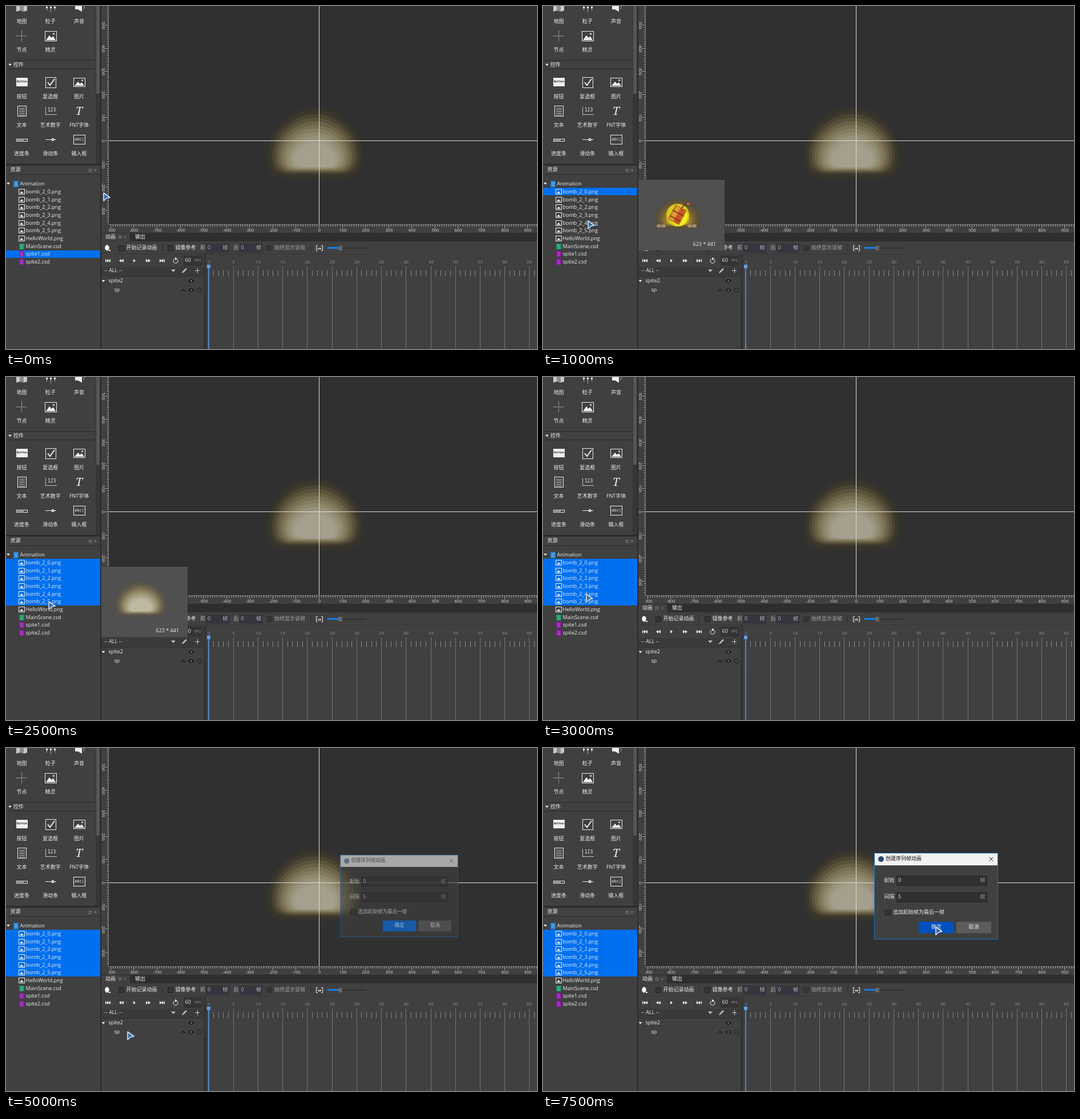
These frames come from a looping animation (930x602 px, 8000 ms). An HTML page with a canvas:

```html
<!DOCTYPE html>
<html lang="zh-CN">
<head>
<meta charset="utf-8">
<title>Animation editor</title>
<style>
  html, body { margin: 0; width: 100%; height: 100%; overflow: hidden; background: #404040; }
  canvas { display: block; }
</style>
</head>
<body>
<canvas id="stage" width="930" height="602"></canvas>
<script>
const ctx = document.getElementById('stage').getContext('2d');
const SANS = '"Open Sans", "Noto Sans CJK SC", "Noto Sans CJK", sans-serif';
const SERIF = '"Noto Serif", serif';
const MONO = '"DejaVu Sans Mono", monospace';
const LIGHT = '#eeeeee', PANEL = '#404040', DARK = '#303030', BLUE = '#0070f0';

// Drawing helpers
function rect(x, y, w, h, color) {
  ctx.fillStyle = color;
  ctx.fillRect(x, y, w, h);
}
function frame(x, y, w, h, color, width = 1) {
  ctx.strokeStyle = color;
  ctx.lineWidth = width;
  ctx.strokeRect(x + .5, y + .5, w - 1, h - 1);
}
function text(str, x, y, color = LIGHT, align = 'left', size = 9, font = SANS) {
  ctx.font = `${size}px ${font}`;
  ctx.textAlign = align;
  ctx.textBaseline = 'middle';
  ctx.fillStyle = color;
  ctx.fillText(str, x, y);
}
function trace(points) {
  ctx.beginPath();
  for (let i = 0; i < points.length; i += 2) ctx.lineTo(points[i], points[i + 1]);
}
function poly(color, ...points) {
  trace(points);
  ctx.fillStyle = color;
  ctx.fill();
}
function line(color, width, ...points) {
  trace(points);
  ctx.strokeStyle = color;
  ctx.lineWidth = width;
  ctx.stroke();
}
function ellipse(x, y, rx, ry, color) {
  ctx.beginPath();
  ctx.ellipse(x, y, rx, ry, 0, 0, 7);
  ctx.fillStyle = color;
  ctx.fill();
}
function ring(x, y, r, color, from = 0, to = 7) {
  ctx.beginPath();
  ctx.arc(x, y, r, from, to);
  ctx.strokeStyle = color;
  ctx.lineWidth = 1;
  ctx.stroke();
}
function cross(x, y, r, color) {
  line(color, 1, x - r, y - r, x + r, y + r);
  line(color, 1, x + r, y - r, x - r, y + r);
}
function at(x, y, draw, angle = 0) {
  ctx.save();
  ctx.translate(x, y);
  ctx.rotate(angle);
  draw();
  ctx.restore();
}

// Nested bands that shrink towards the bright core
function dome(cx, top, w, h, colors) {
  colors.forEach((color, i) => {
    const f = i / (colors.length - 1);
    const half = w / 2 * (1 - .58 * f), t = top + h * .5 * f;
    const b = top + h * (1 - .17 * Math.sqrt(f)), s = t + (b - t) * .68;
    ctx.beginPath();
    ctx.moveTo(cx - half, s);
    ctx.bezierCurveTo(cx - half, t + (s - t) * .5, cx - half * .52, t, cx, t);
    ctx.bezierCurveTo(cx + half * .52, t, cx + half, t + (s - t) * .5, cx + half, s);
    ctx.bezierCurveTo(cx + half, b - (b - s) * .2, cx + half * .85, b, cx + half * .5, b);
    ctx.lineTo(cx - half * .5, b);
    ctx.bezierCurveTo(cx - half * .85, b, cx - half, b - (b - s) * .2, cx - half, s);
    ctx.fillStyle = color;
    ctx.fill();
  });
}

// Left panels
function picture(x, y, w, h) {
  frame(x, y, w, h, LIGHT);
  poly(LIGHT, x + 2, y + h - 2, x + w * .38, y + h * .42, x + w * .55, y + h * .65,
    x + w * .7, y + h * .5, x + w - 2, y + h - 2);
  rect(x + w * .68, y + h * .2, w * .12, h * .15, LIGHT);
}
function drawWidgets() {
  const names = [['地图', '粒子', '声音'], ['节点', '精灵'], ['按钮', '复选框', '图片'],
    ['文本', '艺术数字', 'FNT字体'], ['进度条', '滑动条', '输入框']];
  const rows = [28, 78, 160, 210, 260];
  names.forEach((row, r) => row.forEach((name, c) => text(name, 27.5 + c * 50.3, rows[r], LIGHT, 'center')));

  poly('#c8c8c8', 18, 0, 24, 0, 24, 8, 18, 10);
  poly('#8c8c8c', 24, 0, 31, 0, 31, 10, 24, 8);
  poly('#c8c8c8', 31, 0, 37, 0, 37, 8, 31, 10);
  for (const [x, y] of [[71, 8], [78, 11], [85, 8]]) {
    line('#b0b0b0', 1, x + .5, 3, x + .5, y);
    rect(x - 1, 1, 3, 3, LIGHT);
  }
  poly(LIGHT, 121, 0, 133, 0, 133, 10, 126, 6, 121, 6);
  ring(132, 2, 5, '#b0b0b0', -.8, .9);

  ctx.setLineDash([2, 1]);
  line('#c0c0c0', 1, 18, 52.5, 37, 52.5);
  line('#c0c0c0', 1, 27.5, 43, 27.5, 62);
  ctx.setLineDash([]);
  picture(68, 44, 21, 18);
  rect(18, 126, 20, 15, '#f0f0f0');
  text('Button', 28, 133, '#222', 'center', 'bold 5', MONO);
  frame(69, 125, 19, 19, LIGHT);
  line(LIGHT, 2, 73, 134, 77, 139, 85, 128);
  picture(118, 126, 21, 16);
  frame(20, 175, 16, 19, LIGHT);
  for (let y = 179; y < 192; y += 3) line('#c0c0c0', 1, 23, y + .5, 33, y + .5);
  text('123', 80, 183, LIGHT, 'center', 8, MONO);
  line('#c0c0c0', 1, 69.5, 177, 69.5, 191.5);
  line('#c0c0c0', 1, 69, 190.5, 89, 190.5);
  text('T', 128, 185, LIGHT, 'center', 'italic 20', SERIF);
  frame(18, 233, 20, 5, LIGHT);
  rect(20, 235, 11, 1, LIGHT);
  line(LIGHT, 1, 69, 234.5, 88, 234.5);
  ellipse(82, 234.5, 2.5, 2.5, LIGHT);
  rect(81, 234, 2, 1, PANEL);
  frame(118, 226, 21, 17, LIGHT);
  text('abc|', 128.5, 234, LIGHT, 'center', 7, MONO);
}
const files = ['bomb_2_0.png', 'bomb_2_1.png', 'bomb_2_2.png', 'bomb_2_3.png', 'bomb_2_4.png',
  'bomb_2_5.png', 'HelloWorld.png', 'MainScene.csd', 'spite1.csd', 'spite2.csd'];
const rowY = i => 326 + i * 13.67;
const rowTop = i => Math.round(318.6 + i * 13.75);

function drawLeft([first, last]) {
  rect(0, 0, 167, 602, PANEL);
  drawWidgets();
  rect(157, 0, 9, 278, '#363636');
  rect(158, 0, 6, 154, '#565656');
  rect(0, 95, 157, 1, '#2c2c2c');
  rect(0, 110, 157, 1, '#2c2c2c');
  poly(LIGHT, 4, 101.5, 10, 101.5, 7, 105);
  text('控件', 13, 104);
  rect(0, 277, 166, 3, '#2c2c2c');
  rect(0, 280, 166, 15, '#424242');
  rect(0, 295, 166, 1, '#2c2c2c');
  text('资源', 7.5, 288);
  frame(145, 286, 5, 5, '#808080');
  cross(156, 288, 2, '#808080');

  poly(LIGHT, 1, 310, 7, 310, 4, 313.5);
  rect(13, 307, 9, 11, '#2080d0');
  for (let y = 309; y < 317; y += 2) rect(15, y, 5, 1, '#78b4e4');
  text('Animation', 24.5, 312.5);
  rect(0, rowTop(first), 165, rowTop(last + 1) - rowTop(first), BLUE);
  files.forEach((name, i) => {
    const y = Math.round(rowY(i));
    if (i < 7) {
      frame(22, y - 5, 11, 10, LIGHT);
      poly(LIGHT, 24, y + 3, 27, y - 1, 31, y + 3);
    } else {
      rect(23, y - 5, 9, 10, i === 7 ? '#189060' : '#8c18a4');
      for (let d = -3; d < 4; d += 2) rect(25, y + d, 5, 1, i === 7 ? '#58c090' : '#b850cc');
    }
    text(name, 34.5, y + .5);
  });
  rect(165, 0, 2, 602, '#2c2c2c');
}

// Viewport with rulers
const UNIT = .4057, ORIGIN_X = 548, ORIGIN_Y = 236;
function drawViewport() {
  rect(167, 0, 763, 398, PANEL);
  rect(180, 0, 750, 384, DARK);
  dome(541, 177, 170, 127, ['#35332c', '#3d382c', '#4a4432', '#5a523b', '#6a6147', '#797053',
    '#857c5f', '#90886d', '#98917a', '#9f9a85', '#a5a08e']);
  rect(ORIGIN_X, 0, 1, 384, '#deded6');
  rect(180, ORIGIN_Y, 750, 1, '#deded6');

  ctx.save();
  ctx.beginPath();
  ctx.rect(180, 384, 750, 15);
  ctx.clip();
  for (let u = -910; u <= 940; u += 10) {
    const x = Math.round(ORIGIN_X + u * UNIT), major = u % 100 === 0;
    rect(x, 384, 1, major ? 6 : 3, '#a8a8a8');
    if (major) text(u, x + 1, 394, '#d8d8d8', 'center', 7.5);
  }
  ctx.restore();
  for (let u = -350; u <= 580; u += 10) {
    const y = Math.round(ORIGIN_Y - u * UNIT), major = u % 100 === 0;
    rect(major ? 174 : 177, y, major ? 6 : 3, 1, '#a8a8a8');
    if (major) at(170, y + 1, () => text(u, 0, 0, '#d8d8d8', 'center', 7.5), Math.PI / 2);
  }
  rect(179, 0, 1, 384, '#7c7c7c');
  rect(180, 383, 750, 1, '#7c7c7c');
}

// Timeline
function checkbox(x, y, border = '#222') {
  rect(x, y, 10, 10, '#343434');
  frame(x, y, 10, 10, border);
}
function eye(x, y) {
  ellipse(x, y, 5, 3, '#1e1e1e');
  ellipse(x, y, 1.5, 1.5, '#777');
}
function transportIcons() {
  const y = 447, tri = (x, d) => poly(LIGHT, x, y - 3, x, y + 3, x + 4 * d, y);
  rect(174, y - 3, 1, 6, LIGHT); tri(179, -1); tri(183, -1);
  tri(202, -1); tri(206, -1);
  tri(223, 1);
  tri(245, 1); tri(249, 1);
  tri(269, 1); tri(273, 1); rect(277, y - 3, 1, 6, LIGHT);
  ring(297, 447.5, 4, LIGHT, -.9, 4.2);
  poly(LIGHT, 296, 441, 300, 443.5, 296, 446);
}
function drawTimeline() {
  rect(167, 398, 763, 15, '#2e2e2e');
  rect(167, 399, 50, 14, PANEL);
  text('动画', 174, 406);
  frame(197, 403, 5, 5, '#808080');
  cross(208.5, 405.5, 2, '#808080');
  text('输出', 226, 406);

  rect(167, 413, 763, 189, PANEL);
  rect(167, 435, 763, 1, '#363636');
  ellipse(177, 424.5, 3.8, 5, '#f4f4f4');
  rect(180, 428, 3, 2, LIGHT);
  checkbox(197, 420);
  text('开始记录动画', 210.5, 425);
  rect(273, 417, 1, 15, '#2c2c2c');
  checkbox(283, 420);
  text('镜像参考', 296.5, 425);
  [['前', 340], ['后', 398.5]].forEach(([name, x]) => {
    text(name, x, 425, '#b8b8c0');
    rect(x + 10, 417, 41, 16, '#35353d');
    text('0', x + 13, 425, '#b8b8c0');
    text('帧', x + 39.5, 425, '#b8b8c0');
  });
  checkbox(456, 420, '#303030');
  text('始终显示该帧', 470, 425, '#a4a4a4');
  rect(533, 417, 1, 15, '#2c2c2c');
  line(LIGHT, 1, 546, 420.5, 543.5, 420.5, 543.5, 429.5, 546, 429.5);
  line(LIGHT, 1, 552, 420.5, 554.5, 420.5, 554.5, 429.5, 552, 429.5);
  line(LIGHT, 1, 546.5, 424, 546.5, 426.5, 551.5, 426.5, 551.5, 424);
  rect(549, 424, 1, 2, LIGHT);
  rect(586, 424, 45, 2, '#303030');
  rect(563, 423, 19, 3, '#1080f0');
  rect(582, 421, 7, 8, '#666');

  transportIcons();
  rect(311, 438, 33, 18, '#333');
  text('60', 313.5, 447);
  text('FPS', 330, 447, '#999', 'left', 7);
  rect(167, 458, 180, 16, '#3a3a3a');
  text('-- ALL --', 172, 465);
  poly('#c0c0c0', 289, 462.5, 297, 462.5, 293, 467);
  line('#c0c0c0', 2.5, 310, 467, 316, 461);
  poly('#c0c0c0', 308, 469, 309, 466, 311, 468);
  line('#c8c8c8', 1, 331, 464.5, 339, 464.5);
  line('#c8c8c8', 1, 335.5, 460, 335.5, 469);

  rect(167, 474, 180, 1, '#303030');
  poly(LIGHT, 167.5, 481, 173.5, 481, 170.5, 484.5);
  text('spite2', 179.5, 483);
  eye(324.5, 482.5);
  text('sp', 189.5, 499);
  line('#1e1e1e', 1.5, 306, 501, 310, 497, 314, 501);
  eye(324.5, 498.5);
  ring(339, 498.5, 3.8, '#1e1e1e');
  rect(346, 436, 5, 166, '#363636');
  rect(347, 508, 2, 94, '#2e2e2e');

  for (let i = 0; i <= 66; i++) {
    const x = Math.round(354.5 + i * 8.645);
    if (i % 5) {
      rect(x, 464, 1, 10, '#8a8a8a');
    } else {
      rect(x, 457, 1, 145, '#747474');
      text(i, x + .5, 450, i ? '#929292' : '#5c8cc8', 'center', 8);
    }
  }
  rect(354, 457, 2, 145, '#5088cc');
  rect(352, 454, 6, 6, '#60a0e8');
}

// Hover previews, centred on the hovered row
function gradient(fill, ...colors) {
  colors.forEach((color, i) => fill.addColorStop(i / (colors.length - 1), color));
  return fill;
}
const previews = {
  3: { height: 124, size: '623 * 441', draw() {
    dome(236, 337, 80, 55, ['#554f3e', '#625538', '#74622f', '#8b7430', '#a98f30', '#c8ad35']);
    ellipse(236, 367, 20, 20, '#d8c81c');
    ellipse(238, 369, 15, 17, '#f4ec20');
    at(235, 367, () => {
      rect(-11, -15, 22, 29, '#b46a24');
      rect(-9, -14, 8, 27, '#e09a3c');
      rect(2, -14, 5, 27, '#d44c28');
      rect(-11, -5, 22, 2, '#8a3c1c');
      rect(-11, 6, 22, 2, '#8a3c1c');
    }, .5);
    line('#6c3820', 2, 243, 355, 247, 349, 253, 347);
    ellipse(254, 347, 2.5, 2, '#e06030');
    for (const x of [203, 211, 257, 265]) ellipse(x, 386, 4, 3, '#a48c68');
  } },
  5: { height: 123, size: '623 * 441', draw() {
    dome(236, 357, 92, 65, ['#535149', '#5c574a', '#6a624d', '#7a7055', '#8c8263', '#9b9272',
      '#a9a184', '#b4ad94', '#bfb9a3']);
  } },
  6: { height: 117, size: '960 * 640', draw() {
    rect(170, 351, 144, 96, gradient(ctx.createLinearGradient(0, 351, 0, 447),
      '#c4c4c4', '#dcdcdc', '#c0c0c0', '#a0a0a0', '#b0b0b0', '#808080'));
    rect(170, 351, 144, 96, gradient(ctx.createLinearGradient(170, 0, 314, 0),
      '#0006', '#0001', '#0000', '#0001', '#0006'));
    at(242, 429, () => {
      ctx.scale(1, .2);
      ellipse(0, 0, 70, 70, gradient(ctx.createRadialGradient(0, 0, 20, 0, 0, 70), '#f0f0f0', '#e0e0e0', '#c0c0c000'));
    });
    rect(216, 372, 54, 54, '#1490b0');
  } }
};
function drawPreview(row) {
  const { height, size, draw } = previews[row];
  const top = Math.round(rowY(row) - height / 2);
  rect(167, top, 151, height, '#505050');
  draw();
  text(size, 303, top + height - 10.5, LIGHT, 'right');
}

function drawDialog(buttonColor) {
  rect(580, 184, 217, 152, PANEL);
  rect(580, 184, 217, 22, '#f2f2f2');
  frame(580, 184, 217, 152, '#1874c8');
  ellipse(592, 195, 5, 5, '#28486c');
  text('创建序列帧动画', 600, 195, '#111');
  cross(785, 195, 3.5, '#222');
  [['起始', '0', 233], ['间隔', '5', 262]].forEach(([label, value, y]) => {
    text(label, 597.5, y);
    rect(619, y - 9, 159, 18, '#303030');
    frame(619, y - 9, 159, 18, '#282828');
    text(value, 622, y);
    text('帧', 765.5, y, '#999');
  });
  checkbox(599, 284);
  text('追加起始帧为最后一帧', 613, 289);
  rect(658, 305, 62, 20, buttonColor);
  text('确定', 689, 315, LIGHT, 'center');
  rect(724, 305, 61, 20, '#5c5c5c');
  text('取消', 754.5, 315, LIGHT, 'center');
}

function drawDrag(x, y) {
  rect(187, 490, 160, 1, '#f0f0f0');
  rect(x + 13, y - 4, 19, 22, '#eceef0');
  for (let d = 1; d < 16; d += 3) rect(x + 15, y + d, 14, 1, d < 3 ? '#d89090' : '#b8b8b8');
  rect(x + 22, y + 4, 8, 9, '#3c80b8');
  rect(x + 24, y + 6, 4, 5, '#d8e8f4');
}
function drawCursor(x, y) {
  at(x, y, () => {
    ctx.lineJoin = 'round';
    trace([0, 1, 11, 9, 5, 10.5, 0, 15]);
    ctx.closePath();
    ctx.strokeStyle = '#1c3c64';
    ctx.lineWidth = 2.4;
    ctx.stroke();
    ctx.fillStyle = '#3c6c9c';
    ctx.fill();
    ctx.strokeStyle = '#d4e8fa';
    ctx.lineWidth = 1.6;
    ctx.stroke();
    ctx.lineJoin = 'miter';
  });
}

// One state per half second; selection is a range of file rows
const ALL = [0, 5], HOVER = '#1c84ff', PRESSED = '#0050c0';
const held = { cursor: [76, 380], selected: ALL };
const states = [
  { cursor: [171, 327], selected: [8, 8] },
  { cursor: [84, 408], selected: [8, 8], preview: 6 },
  { cursor: [79, 376], selected: [0, 0], preview: 3 },
  { cursor: [76, 407], selected: [0, 0], preview: 6 },
  { cursor: [76, 394], selected: [0, 0], preview: 5 },
  { cursor: [75, 393], selected: ALL, preview: 5 },
  held,
  held,
  { cursor: [213, 499], selected: ALL, drag: true },
  { cursor: [213, 506], selected: ALL, drag: true },
  { cursor: [213, 497], selected: ALL, dialog: BLUE, opening: true },
  { cursor: [630, 300], selected: ALL, dialog: BLUE },
  { cursor: [684, 327], selected: ALL, dialog: BLUE },
  { cursor: [696, 316], selected: ALL, dialog: HOVER },
  { cursor: [688, 313], selected: ALL, dialog: HOVER },
  { cursor: [688, 313], selected: ALL, dialog: PRESSED }
];

function render(now) {
  const s = states[Math.floor(now % 8000 / 500)];
  drawViewport();
  drawTimeline();
  drawLeft(s.selected);
  if (s.preview) drawPreview(s.preview);
  if (s.dialog) {
    ctx.save();
    if (s.opening) {
      ctx.globalAlpha = .6;
      ctx.translate(688.5 * .05, 260 * .05);
      ctx.scale(.95, .95);
    }
    drawDialog(s.dialog);
    ctx.restore();
  }
  if (s.drag) drawDrag(...s.cursor);
  drawCursor(...s.cursor);
  requestAnimationFrame(render);
}
requestAnimationFrame(render);
</script>
</body>
</html>
```
